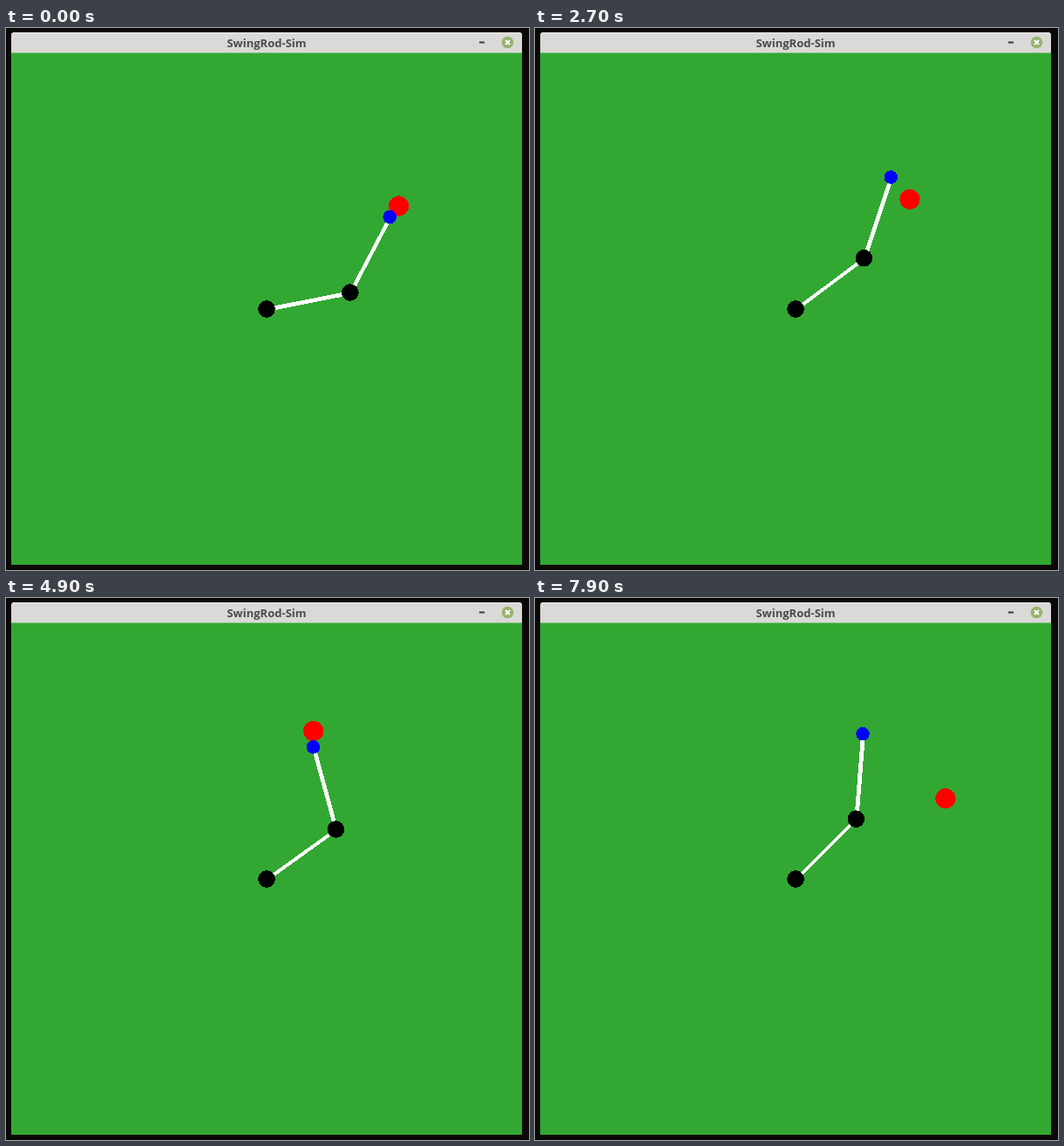
Recreate the animation shown at these times as an HTML page. Size 600x621 px, loop 8000 ms.

```html
<!DOCTYPE html>
<html lang="en">
<head>
<meta charset="utf-8">
<title>SwingRod-Sim</title>
<style>
  html, body { margin: 0; width: 100%; height: 100%; overflow: hidden; background: #0b0908; }
  svg { display: block; width: 100%; height: 100%; }
  text { font: 700 13px "Open Sans", "Noto Sans", sans-serif; fill: #4a4a4a; text-anchor: middle; }
</style>
</head>
<body>
<svg viewBox="0 0 600 621">
  <rect width="600" height="621" fill="#0b0908"/>
  <path d="M6 30V8q0-3 3-3H589q3 0 3 3V30z" fill="#dad9d7"/>
  <path d="M8 5.5H590" stroke="#eeedec"/>
  <rect x="6" y="28.5" width="586" height="586.5" fill="#32a832"/>
  <text x="299" y="22">SwingRod-Sim</text>
  <rect x="543" y="15.5" width="6" height="2" fill="#3c3c3c"/>
  <circle cx="575.5" cy="16.5" r="6.8" fill="#98b36c"/>
  <path d="M573 14l5 5m0-5l-5 5" stroke="#fff" stroke-width="1.8"/>
  <g shape-rendering="crispEdges">
    <circle id="target" r="11.6" fill="#f00"/>
    <polygon id="upper" fill="#fff"/>
    <polygon id="fore" fill="#fff"/>
    <circle cx="299" cy="322" r="9.8"/>
    <circle id="elbow" r="9.8"/>
    <circle id="tip" r="7.8" fill="#00f"/>
  </g>
</svg>
<script>
const LOOP = 8000, STEP = 100, LINK = 97.7, THICK = 4.9;
const TURN = 0.05 * 180 / Math.PI; // degrees a joint may turn per step
const base = [299, 322];

// From each time on, both joints turn towards [shoulder, bend].
const moves = [
  { at: 0, target: [450.5, 204], goal: [11.2, 51.1] },
  { at: 1300, target: [402, 143.5], goal: [39.5, 32.1] },
  { at: 2600, target: [430, 196.3], goal: [24.2, 40] },
  { at: 3600, target: [352.7, 152.5], goal: [24.2, 69.7] },
  { at: 4500, target: [352.7, 152.5], goal: [35.8, 69.7] },
  { at: 6300, target: [379, 146.5], goal: [39.3, 55] },
  { at: 7400, target: [471, 229.7], goal: [44.8, 40.2] }
];

const el = id => document.getElementById(id);

function approach(from, to, limit) {
  return from + Math.max(-limit, Math.min(limit, to - from));
}

function stateAt(t) {
  let pose = moves[0].goal, target;
  moves.forEach((move, i) => {
    if (move.at > t) return;
    const end = Math.min(t, moves[i + 1]?.at ?? LOOP);
    const limit = TURN * (end - move.at) / STEP;
    pose = pose.map((angle, n) => approach(angle, move.goal[n], limit));
    target = move.target;
  });
  return { pose, target };
}

function reach([x, y], degrees) {
  const r = degrees * Math.PI / 180;
  return [x + LINK * Math.cos(r), y - LINK * Math.sin(r)];
}

function place(id, [x, y]) {
  el(id).setAttribute("cx", x);
  el(id).setAttribute("cy", y);
}

// Thickness runs along one axis, so diagonal links look thinner.
function drawLink(id, [x1, y1], [x2, y2]) {
  const steep = Math.abs(y2 - y1) > Math.abs(x2 - x1);
  const dx = steep ? THICK / 2 : 0, dy = steep ? 0 : THICK / 2;
  el(id).setAttribute("points", [
    x1 - dx, y1 - dy, x2 - dx, y2 - dy, x2 + dx, y2 + dy, x1 + dx, y1 + dy
  ].map(v => v + 0.5).join(" "));
}

function draw(time) {
  const { pose: [shoulder, bend], target } = stateAt(Math.floor(time % LOOP / STEP) * STEP);
  const elbow = reach(base, shoulder), tip = reach(elbow, shoulder + bend);
  place("target", target);
  drawLink("upper", base, elbow);
  drawLink("fore", elbow, tip);
  place("elbow", elbow);
  place("tip", tip);
}

const start = performance.now();
function tick() {
  draw(performance.now() - start);
  requestAnimationFrame(tick);
}
tick();
</script>
</body>
</html>
```
